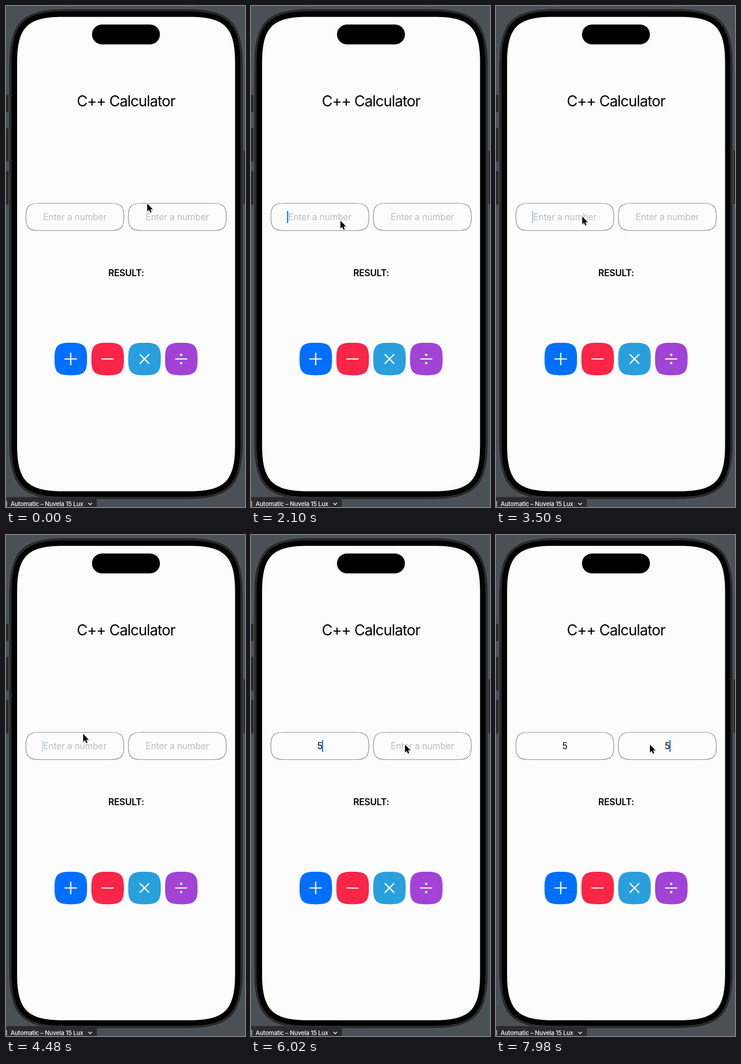
Write an HTML page that moves like this. It is 517 px wide and 1083 px high and loops after 8000 ms.

```html
<!DOCTYPE html>
<html lang="en">
<head>
<meta charset="utf-8">
<title>C++ Calculator</title>
<style>
  html, body { margin: 0; width: 100%; height: 100%; overflow: hidden; background: #4a5056; }
  svg { display: block; width: 517px; height: 1083px; }
  text { font: 19.5px Inter, "Open Sans", sans-serif; font-optical-sizing: none; letter-spacing: -.27px; text-anchor: middle; }
  .title { font-size: 32px; letter-spacing: -1.1px; }
  .result { font-weight: 600; }
  .hint { fill: #bdbdc0; }
  .device { font-size: 13px; font-weight: 500; letter-spacing: -.22px; text-anchor: start; fill: #fff; }
  .icon { stroke: #fff; stroke-width: 2.7; stroke-linecap: round; fill: none; }
</style>
</head>
<body>
<svg viewBox="0 0 517 1083">
  <g fill="#292827" stroke="#3b3d3f" stroke-width=".6">
    <rect x="-4" y="192" width="10" height="37"/>
    <rect x="-4" y="264" width="10" height="72"/>
    <rect x="-4" y="357" width="10" height="72"/>
    <rect x="513" y="312" width="8" height="116"/>
  </g>
  <g id="shapes"></g>
  <rect x="186" y="40" width="147" height="43" rx="21.5"/>
  <text class="title" x="259.5" y="217">C++ Calculator</text>
  <text class="result" x="260" y="584">RESULT:</text>
  <g id="fields"></g>
  <rect id="caret" y="443" width="2.4" height="26" rx="1" fill="#0a6ee6"/>
  <g class="icon">
    <path d="M127.500 763H152.500M140 750.500V775.500"/>
    <path d="M207.500 763H232"/>
    <path d="M290 753.500L309 772.500M309 753.500L290 772.500"/>
    <path d="M367 763H391"/>
  </g>
  <g fill="#fff"><circle cx="379" cy="754" r="2.5"/><circle cx="379" cy="772" r="2.5"/></g>
  <path d="M-2 1061.500H190Q196.500 1061.500 196.500 1068V1085H-2Z" fill="#2b2b2d" stroke="#3c3d3e"/>
  <path d="M-2 1070.500H0Q1.500 1070.500 1.500 1072V1080Q1.500 1081.500 0 1081.500H-2" fill="none" stroke="#ddd" stroke-width="1.300"/>
  <text class="device" x="10" y="1081">Automatic – Nuvela 15 Lux</text>
  <path d="M178.500 1074.500L182 1078L185.500 1074.500" class="icon" style="stroke-width:1.600"/>
  <g id="cursor">
    <path d="M0 0V17L3.900 13.400L6.500 19.400L9.200 18.200L6.700 12.400H12Z" transform="translate(.5 1.500)" fill="#0002" stroke="#0002" stroke-width="2"/>
    <path d="M0 0V17L3.900 13.400L6.500 19.400L9.200 18.200L6.700 12.400H12Z" stroke="#fff" stroke-width="2" stroke-linejoin="round" paint-order="stroke"/>
  </g>
</svg>
<script>
const $ = id => document.getElementById(id);
const LOOP = 8000;

// Rounded rectangle with continuous-curvature corners
function squircle(x, y, w, h, r, fill, stroke = "none", width = 1) {
  const e = r * 1.4, n = e * 0.224, X = x + w, Y = y + h;
  const d = `M${x + e} ${y}H${X - e}C${X - n} ${y} ${X} ${y + n} ${X} ${y + e}` +
    `V${Y - e}C${X} ${Y - n} ${X - n} ${Y} ${X - e} ${Y}` +
    `H${x + e}C${x + n} ${Y} ${x} ${Y - n} ${x} ${Y - e}` +
    `V${y + e}C${x} ${y + n} ${x + n} ${y} ${x + e} ${y}Z`;
  return `<path d="${d}" fill="${fill}" stroke="${stroke}" stroke-width="${width}"/>`;
}

$("shapes").innerHTML =
  squircle(6, 5.5, 507, 1061.5, 89, "#2a2b2d", "#65686b", 1) +
  squircle(12, 11.5, 495, 1049.5, 83, "#000") +
  squircle(24, 23.5, 471.5, 1025.5, 71, "#fcfcfc") +
  ["#006fff", "#fb2548", "#2a9fde", "#a144d6"].map((color, i) =>
    squircle(105 + i * 79.7, 728, 70.3, 70.3, 23, color)).join("");

const fields = [
  { x: 43, focus: 1650, typed: 4900, blur: 6600 },
  { x: 264.6, focus: 6950, typed: 7500, blur: LOOP }
];
$("fields").innerHTML = fields.map(f =>
  squircle(f.x, 426.5, 212, 59, 20.5, "none", "#808084", 1.2) +
  `<text x="${f.x + 106}" y="463.300"></text>`).join("");
const labels = $("fields").querySelectorAll("text");

// Pointer path: time, x, y
const path = [
  [0, 305.5, 427], [100, 305.5, 427], [800, 193.5, 464], [3300, 193.5, 464],
  [3900, 167, 430], [4950, 167, 430], [5360, 259, 457], [5800, 333, 453], [LOOP, 333, 453]
];

const clamp = v => Math.min(1, Math.max(0, v));
const ease = v => v * v * (3 - 2 * v);

function pointer(t) {
  const i = path.findIndex(p => p[0] > t);
  const [t0, x0, y0] = path[i - 1], [t1, x1, y1] = path[i];
  const k = ease((t - t0) / (t1 - t0));
  return [x0 + (x1 - x0) * k, y0 + (y1 - y0) * k];
}

function blink(age) {
  const p = age % 1000;
  return p < 650 ? 1 - clamp((p - 500) / 150) : clamp((p - 790) / 160);
}

function draw(t) {
  let opacity = 0;
  fields.forEach((f, i) => {
    const typed = t >= f.typed;
    labels[i].textContent = typed ? "5" : "Enter a number";
    labels[i].setAttribute("class", typed ? "" : "hint");
    if (t >= f.focus && t < f.blur) {
      opacity = blink(t - (typed ? f.typed : f.focus));
      $("caret").setAttribute("x", f.x + (typed ? 110.6 : 35));
    }
  });
  $("caret").setAttribute("opacity", opacity);
  $("cursor").setAttribute("transform", `translate(${pointer(t)})`);
}

const start = performance.now();
function tick() {
  draw((performance.now() - start) % LOOP);
  requestAnimationFrame(tick);
}
tick();
</script>
</body>
</html>
```
